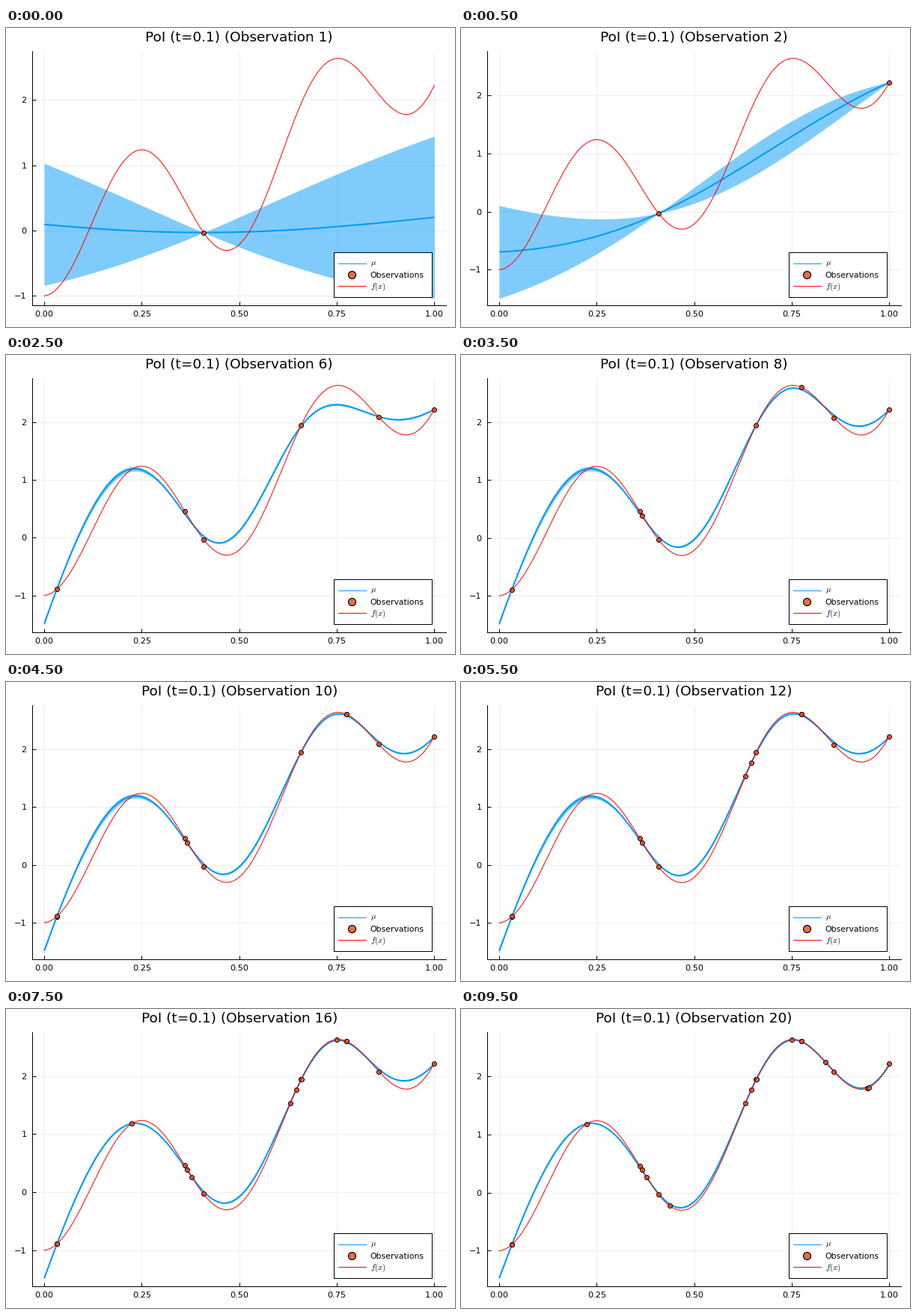
Recreate the animation shown at these times as a matplotlib script. Size 600 by 400 pixels, loop 10000 ms.

```python
import numpy as np
import matplotlib.pyplot as plt
from matplotlib.animation import FuncAnimation
from matplotlib.patches import Rectangle

W, H, DPI = 600, 400, 100
PX = 72 / DPI
BLUE, ORANGE = "#009AFA", "#E36F47"
LEFT, RIGHT, TOP, BOTTOM = 35.4, 588, 31, 371.4

plt.rcParams.update({"font.family": "DejaVu Sans", "mathtext.fontset": "cm"})

# Sampled positions in the order they are queried
SAMPLES = np.array([
    0.4085, 1.0, 0.858, 0.0326, 0.36, 0.6585, 0.7745, 0.3667, 0.7755, 0.0334,
    0.646, 0.6312, 0.6592, 0.7497, 0.3785, 0.2246, 0.9445, 0.8354, 0.4367, 0.9474])
GRID = np.linspace(0, 1, 301)


def objective(x):
    return 1.28 * x**3 + 1.285 * x**2 + 0.564 * x - np.cos(13 * x)


def kernel(a, b):
    """Matern 5/2 with unit length and variance."""
    d = np.sqrt(5) * np.abs(a[:, None] - b[None, :])
    return (1 + d + d**2 / 3) * np.exp(-d)


def posterior(x_obs, noise=1e-5, prior_mean=1.0):
    gram = kernel(x_obs, x_obs) + noise * np.eye(len(x_obs))
    cross = kernel(GRID, x_obs)
    mean = prior_mean + cross @ np.linalg.solve(gram, objective(x_obs) - prior_mean)
    var = 1 - np.sum(cross * np.linalg.solve(gram, cross.T).T, axis=1)
    return mean, 1.96 * np.sqrt(np.maximum(var, 0))


def dots(axes, x, y, size, edge):
    axes.plot(x, y, "o", ms=size * PX, mfc=ORANGE, mec="black", mew=edge * PX,
              clip_on=False)


fig = plt.figure(figsize=(W / DPI, H / DPI), dpi=DPI, facecolor="white")
ax = fig.add_axes([LEFT / W, 1 - BOTTOM / H, (RIGHT - LEFT) / W, (BOTTOM - TOP) / H])

# Overlay in pixel coordinates for title and legend
top = fig.add_axes([0, 0, 1, 1])
top.set(xlim=(0, W), ylim=(H, 0))
top.axis("off")
title = top.text(311.7, 18, "", size=18.5 * PX, ha="center", va="baseline")
top.add_patch(Rectangle((437.8, 299.5), 131.5, 60.5, fc="white", ec="black", lw=PX))
top.plot([444, 481], [315, 315], color=BLUE, lw=PX)
top.plot([444, 481], [345, 345], color="red", lw=PX)
dots(top, [462.3], [330], 10, 1.2)
for y, label in ((317, r"$\mu$"), (334, "Observations"), (348.5, r"$f(x)$")):
    top.text(486.7, y, label, size=10.9 * PX, va="baseline")


def draw(frame):
    x_obs = SAMPLES[:frame + 1]
    mean, band = posterior(x_obs)
    truth = objective(GRID)
    low = min((mean - band).min(), truth.min())
    high = max((mean + band).max(), truth.max())
    margin = 0.03 * (high - low)

    ax.clear()
    ax.set(xlim=(-0.03, 1.03), ylim=(low - margin, high + margin))
    ax.set_xticks(np.linspace(0, 1, 5))
    ax.set_yticks(np.arange(np.ceil(low - margin), high + margin))
    ax.xaxis.set_major_formatter("{x:.2f}")
    ax.yaxis.set_major_formatter(lambda v, _: f"{v:.0f}".replace("-", "\u2212"))
    ax.tick_params(direction="in", length=5 * PX, width=PX, labelsize=11.2 * PX)
    ax.tick_params(axis="x", pad=6.5 * PX)
    ax.tick_params(axis="y", pad=8 * PX)
    ax.grid(color="black", alpha=0.1, lw=0.6 * PX)
    ax.set_axisbelow(True)
    ax.spines[["top", "right"]].set_visible(False)
    ax.spines[["left", "bottom"]].set_linewidth(PX)

    ax.fill_between(GRID, mean - band, mean + band, color=BLUE, alpha=0.5, lw=0)
    ax.plot(GRID, mean, color=BLUE, lw=2 * PX, solid_capstyle="butt")
    dots(ax, x_obs, objective(x_obs), 6, 1)
    ax.plot(GRID, truth, color="red", lw=PX, zorder=3)
    title.set_text(f"PoI (t=0.1) (Observation {frame + 1})")
    return []


anim = FuncAnimation(fig, draw, frames=20, interval=500, init_func=lambda: [],
                     repeat=True, repeat_delay=0, blit=False)
plt.show()
```
